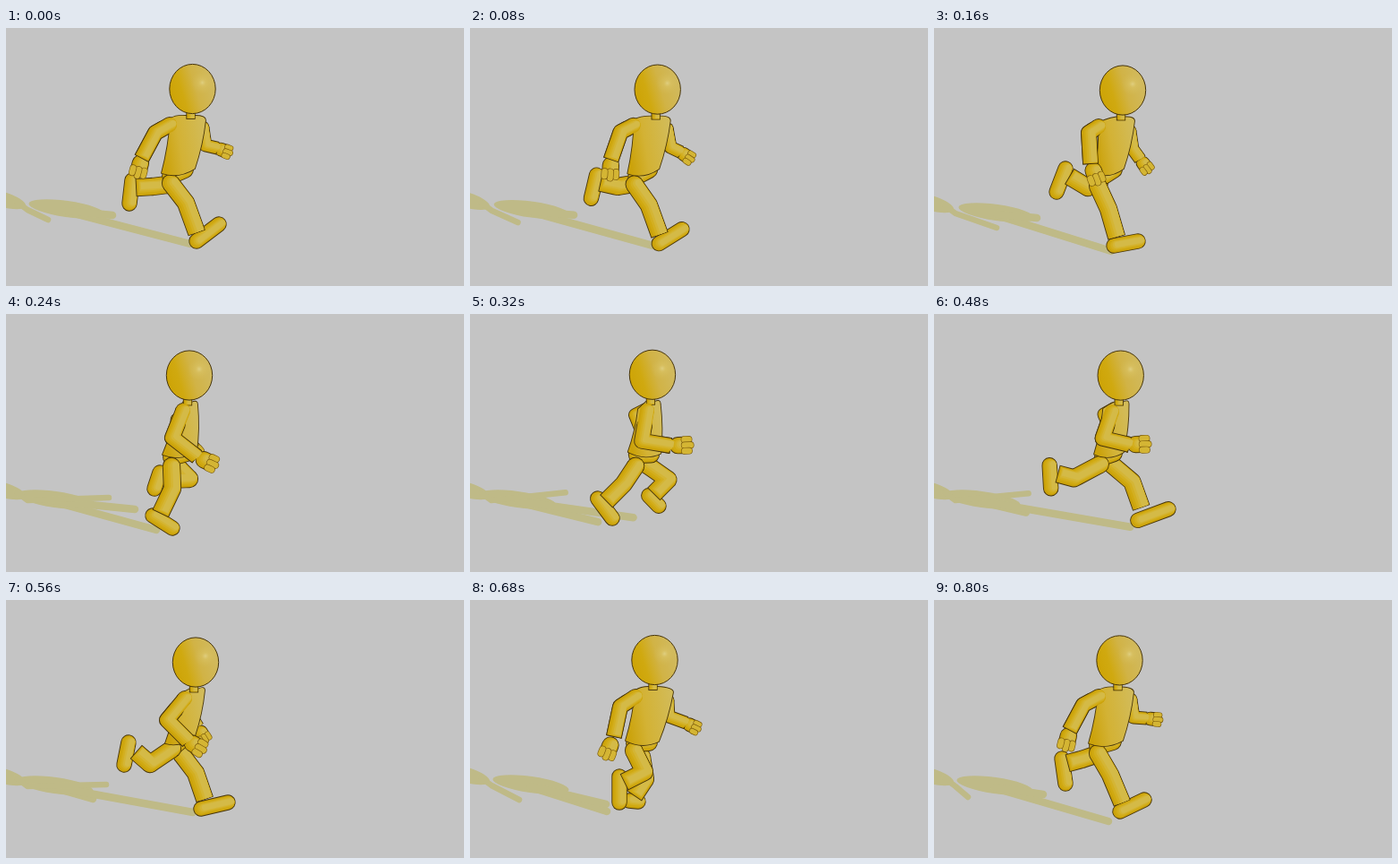
Animation, 512 px wide and 288 px high, one loop 0.84 s. Source, as an HTML page with a canvas:

```html
<!DOCTYPE html>
<html lang="en">
<head>
<meta charset="utf-8">
<title>Run cycle</title>
<style>
  html, body { margin: 0; width: 100%; height: 100%; overflow: hidden; background: #c4c4c4; }
  canvas { display: block; width: 512px; height: 288px; }
</style>
</head>
<body>
<canvas id="stage" width="512" height="288"></canvas>
<script>
const ctx = document.getElementById('stage').getContext('2d');
const LOOP = 840, STEP = 40, CYCLE = 20;
const GROUND = '#c4c4c4', SHADOW = '#bfba87', LINE = '#46340a';
const TONES = ['#cba20a', '#d0a911', '#d3af20', '#d4b534', '#d4ba47'];

// Returns a smooth periodic path through points given as x, y pairs at the key steps.
const KEYS = [0, 3, 5, 9, 13, 16, 19];
const SWING_KEYS = [0, 3, 5, 6, 9, 13, 16, 19];
function track(values, keys = KEYS) {
  const n = keys.length;
  const time = i => keys[(i + n) % n] + CYCLE * Math.floor(i / n);
  const value = (i, axis) => values[((i + n) % n) * 2 + axis];
  const slope = (i, axis) =>
    (value(i + 1, axis) - value(i - 1, axis)) / (time(i + 1) - time(i - 1));
  return step => {
    let i = n - 1;
    while (keys[i] > step) i--;
    const span = time(i + 1) - time(i);
    const u = (step - time(i)) / span, v = 1 - u;
    return [0, 1].map(axis =>
      v * v * (1 + 2 * u) * value(i, axis) + u * u * (3 - 2 * u) * value(i + 1, axis) +
      span * u * v * (v * slope(i, axis) - u * slope(i + 1, axis)));
  };
}
const swing = values => track(values, SWING_KEYS);

const head = track([208.5, 68, 211, 69.5, 205, 68.5, 204.8, 67.5, 212, 69.5, 206.5, 67, 207.5, 67.4]);

const torso = {
  shoulderL: track([184, 101, 184, 106, 190, 108, 186, 104, 192, 107, 185, 101, 184, 101]),
  shoulderR: track([223, 103, 224, 104, 214, 101, 214, 100, 222, 101, 227, 103, 223, 103]),
  waistL: track([174, 162, 180, 162, 175, 157, 179, 153, 178, 160, 174, 157, 173, 160]),
  waistR: track([211, 157, 212, 157, 213, 154, 213, 157, 211, 152, 211, 158, 211, 157])
};

const nearLeg = {
  hip: track([184, 173, 183, 176, 185, 170, 185, 170, 186, 166, 183, 168, 183, 171]),
  knee: track([201, 195, 195, 202, 186, 195, 160, 186, 161, 183, 195, 192, 197, 195]),
  ankle: track([213, 228, 204, 233, 173, 222, 140, 195, 146, 170, 173, 203, 210, 226]),
  heel: track([213, 238, 201, 243, 164, 225, 130, 188, 137, 159, 167, 197, 208, 236]),
  toe: track([238, 219, 228, 238, 186, 239, 140, 214, 132, 184, 167, 226, 235, 223])
};

const farLeg = {
  hip: swing([180, 175, 185, 172, 193, 172, 195, 170, 200, 165, 196, 172, 192, 175, 180, 173]),
  knee: swing([164, 177, 172, 178, 205, 184, 216, 186, 227, 183, 212, 193, 196, 200, 165, 178]),
  ankle: swing([146, 178, 152, 166, 178, 185, 191, 196, 230, 207, 222, 222, 184, 218, 150, 182]),
  heel: swing([141, 170, 147, 157, 172, 177, 184, 191, 226, 222, 218, 233, 178, 224, 143, 177]),
  toe: swing([138, 196, 137, 183, 166, 195, 184, 214, 257, 210, 248, 226, 188, 225, 147, 205])
};

const nearArm = {
  shoulder: track([183, 108, 184, 110, 198, 108, 196, 108, 200, 110, 185, 108, 184, 108]),
  elbow: track([167, 117, 173, 117, 186, 138, 194, 141, 180, 134, 168, 119, 167, 117]),
  wrist: track([152, 145, 175, 151, 213, 159, 225, 137, 203, 157, 161, 152, 152, 145]),
  hand: track([149, 156, 180, 164, 226, 165, 238, 133, 213, 163, 155, 167, 149, 157])
};

const farArm = {
  shoulder: track([220, 111, 219, 115, 205, 109, 196, 104, 210, 108, 221, 112, 220, 111]),
  elbow: track([223, 131, 222, 135, 191, 118, 185, 111, 199, 116, 222, 130, 223, 131]),
  wrist: track([236, 134, 230, 146, 202, 140, 191, 128, 214, 141, 241, 137, 237, 132]),
  hand: track([244, 137, 236, 154, 211, 151, 198, 140, 220, 151, 249, 141, 246, 133])
};

const shade = {
  body: track([68, 202, 70, 206, 55, 207, 55, 207, 55, 207, 68, 206, 68, 207]),
  nearFoot: track([206, 241, 198, 249, 168, 241, 122, 225, 97, 222, 153, 236, 195, 247]),
  farFoot: track([119, 209, 115, 212, 144, 218, 213, 235, 209, 237, 152, 228, 122, 217]),
  hand: track([47, 214, 70, 223, 115, 205, 94, 198, 112, 206, 55, 223, 38, 220])
};

const at = (parts, step) =>
  Object.fromEntries(Object.entries(parts).map(([name, path]) => [name, path(step)]));
const shift = (p, x, y) => [p[0] + x, p[1] + y];
const mix = (a, b, u) => [a[0] + (b[0] - a[0]) * u, a[1] + (b[1] - a[1]) * u];
function extend(from, to, by) {
  const angle = Math.atan2(to[1] - from[1], to[0] - from[0]);
  return shift(to, Math.cos(angle) * by, Math.sin(angle) * by);
}

function strokePath(points, width, color, cap) {
  ctx.beginPath();
  points.forEach(p => ctx.lineTo(...p));
  ctx.lineWidth = width;
  ctx.strokeStyle = color;
  ctx.lineCap = cap;
  ctx.lineJoin = 'round';
  ctx.stroke();
  if (cap === 'butt') dot(points[0], width / 2, color);
}

function dot([x, y], r, color) {
  ctx.beginPath();
  ctx.arc(x, y, r, 0, 7);
  ctx.fillStyle = color;
  ctx.fill();
}

function outline(points, width, cap = 'butt') {
  const last = points.length - 1;
  const end = cap === 'butt' ? extend(points[last - 1], points[last], 0.9) : points[last];
  strokePath([...points.slice(0, last), end], width + 1.8, LINE, cap);
}

// Narrower, lighter bands shifted to the lit side make the round form.
function flesh(points, width, cap = 'butt') {
  TONES.forEach((tone, i) => {
    const band = width * (1 - i * 0.15), move = (width - band) / 2;
    strokePath(points.map(p => shift(p, move * 0.85, -move * 0.3)), band, tone, cap);
  });
}

function tube(points, width, cap) {
  outline(points, width, cap);
  flesh(points, width, cap);
}

function drawHand(wrist, hand, r) {
  const angle = Math.atan2(hand[1] - wrist[1], hand[0] - wrist[0]);
  const c = Math.cos(angle), s = Math.sin(angle);
  const local = (x, y) => [hand[0] + (x * c - y * s) * r, hand[1] + (x * s + y * c) * r];
  tube([local(-0.5, 0), local(0.15, 0)], r * 1.65, 'round');
  [-0.6, 0, 0.6].forEach(y => {
    const finger = [local(0.2, y), local(0.85 - Math.abs(y) * 0.3, y)];
    strokePath(finger, r * 0.62 + 1.3, '#7b5b0c', 'round');
    strokePath(finger, r * 0.62, TONES[3], 'round');
  });
}

function drawLeg({ hip, knee, ankle, heel, toe }) {
  tube([heel, toe], 15.6, 'round');
  const bend = [mix(hip, knee, 0.86), knee, mix(knee, ankle, 0.16)];
  tube([hip, ...bend, ankle], 18.5);
}

function drawTorso({ shoulderL, shoulderR, waistL, waistR }, neck) {
  const curve = (via, to) => ctx.quadraticCurveTo(...via, ...to);
  const fill = ctx.createLinearGradient(waistL[0], 130, shoulderR[0], 122);
  fill.addColorStop(0, TONES[0]);
  fill.addColorStop(0.4, '#d3b234');
  fill.addColorStop(1, '#d2bb58');
  ctx.beginPath();
  ctx.moveTo(neck[0] - 5, neck[1]);
  curve(shift(shoulderL, 6, -4), shoulderL);
  curve(shift(mix(shoulderL, waistL, 0.5), 3, 0), waistL);
  curve(shift(mix(waistL, waistR, 0.5), 0, 9), waistR);
  curve(shift(mix(shoulderR, waistR, 0.5), 3, 0), shoulderR);
  curve(shift(shoulderR, 0, -5), [neck[0] + 5, neck[1]]);
  ctx.closePath();
  ctx.lineWidth = 1.8;
  ctx.lineJoin = 'round';
  ctx.strokeStyle = LINE;
  ctx.stroke();
  ctx.fillStyle = fill;
  ctx.fill();
}

function drawHead([x, y], neck) {
  tube([[x - 2, y + 22], shift(neck, 0, 3)], 8.5);
  ctx.beginPath();
  ctx.ellipse(x, y, 25.7, 27.6, 0, 0, 7);
  const side = ctx.createLinearGradient(x - 26, y + 8, x + 22, y - 6);
  side.addColorStop(0, '#cda304');
  side.addColorStop(0.3, '#d0a910');
  side.addColorStop(0.62, '#d1b346');
  side.addColorStop(1, '#d1b95c');
  ctx.fillStyle = side;
  ctx.fill();
  const glow = ctx.createRadialGradient(x + 11, y - 7, 0, x + 11, y - 7, 13);
  glow.addColorStop(0, 'rgba(226,211,136,.85)');
  glow.addColorStop(0.3, 'rgba(220,198,106,.5)');
  glow.addColorStop(1, 'rgba(212,188,90,0)');
  ctx.fillStyle = glow;
  ctx.fill();
  ctx.lineWidth = 1;
  ctx.strokeStyle = LINE;
  ctx.stroke();
}

function drawShadow({ body, nearFoot, farFoot, hand }) {
  const [x, y] = body;
  const blob = (cx, cy, rx, ry, turn) => {
    ctx.beginPath();
    ctx.ellipse(cx, cy, rx, ry, turn, 0, 7);
    ctx.fillStyle = SHADOW;
    ctx.fill();
  };
  blob(-5, y - 11, 28, 8.5, 0.28);
  blob(x, y, 43, 9, 0.14);
  strokePath([[x, y + 3], nearFoot], 8.5, SHADOW, 'round');
  strokePath([[x, y + 2], farFoot], 8.5, SHADOW, 'round');
  strokePath([[12, y - 8], [24, y + 1], hand], 6.5, SHADOW, 'round');
}

function drawFigure(step) {
  const skull = head(step), neck = shift(skull, -2, 30);
  const trunk = at(torso, step);
  const near = at(nearArm, step), far = at(farArm, step);
  const { shoulder, elbow, wrist } = near;
  const arm = [shoulder, elbow, wrist];

  drawHand(far.wrist, far.hand, 8.4);
  tube([far.shoulder, far.elbow, far.wrist], 13);

  drawLeg(at(farLeg, step));
  tube([shift(trunk.waistL, 10, 3), shift(trunk.waistR, -11, 1)], 18, 'round');
  drawLeg(at(nearLeg, step));

  outline(arm, 16);
  drawTorso(trunk, neck);
  drawHead(skull, neck);

  // The sleeve joins the shirt without a line at the shoulder.
  drawHand(wrist, near.hand, 10.6);
  outline([mix(shoulder, elbow, 0.5), elbow, wrist], 16);
  flesh(arm, 16);
}

function frame() {
  const tick = Math.floor((performance.now() % LOOP) / STEP);
  const step = Math.max(0, tick - 1);
  ctx.fillStyle = GROUND;
  ctx.fillRect(0, 0, 512, 288);
  drawShadow(at(shade, step));
  drawFigure(step);
  requestAnimationFrame(frame);
}
frame();
</script>
</body>
</html>
```
